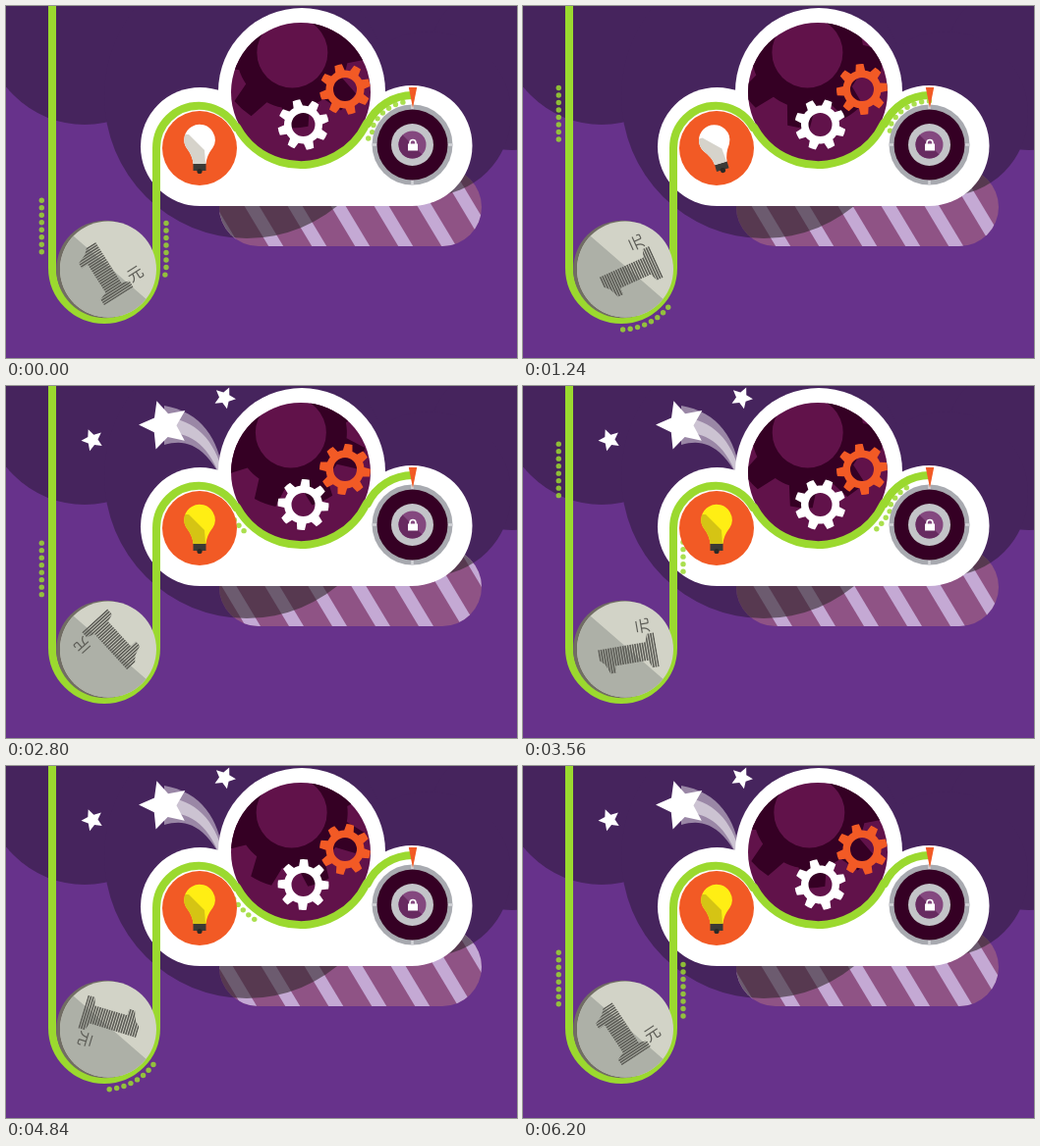
An HTML page with a canvas that plays this animation: 520 by 359 pixels, repeating every 6240 ms.

```html
<!DOCTYPE html>
<html lang="zh">
<head>
<meta charset="utf-8">
<title>Coin machine</title>
<style>
html, body { margin: 0; width: 520px; height: 359px; overflow: hidden; background: #67328b; }
canvas { display: block; }
</style>
</head>
<body>
<canvas id="stage" width="520" height="359"></canvas>
<script>
const ctx = document.getElementById('stage').getContext('2d');
const LOOP = 6240, FRAME = 40, RESTART = 640, SPIN = 2229;
const RAD = Math.PI / 180, TAU = Math.PI * 2;
const GREEN = '#9bd92f', DARK = '#350024', PLUM = '#61124a', ORANGE = '#f25a25';
const clamp = (v) => Math.max(0, Math.min(1, v));
const ease = (v) => 1 - (1 - clamp(v)) ** 2;

// Turns of the coin; gears and stripes share this clock
const spin = (t) => t < RESTART ? t / SPIN - 0.154 : (t - 4320) / SPIN;

function disc(x, y, r, color) {
  ctx.beginPath();
  ctx.arc(x, y, r, 0, TAU);
  ctx.fillStyle = color;
  ctx.fill();
}

function poly(points, color) {
  ctx.beginPath();
  points.forEach((p) => ctx.lineTo(p[0], p[1]));
  ctx.closePath();
  if (color) {
    ctx.fillStyle = color;
    ctx.fill();
  }
}

function clipDisc(x, y, r) {
  ctx.beginPath();
  ctx.arc(x, y, r, 0, TAU);
  ctx.clip();
}

function scoped(draw) {
  ctx.save();
  draw();
  ctx.restore();
}

function gear(x, y, outer, body, hole, turn, color) {
  const step = TAU / 8;
  ctx.beginPath();
  for (let i = 0; i < 8; i++) {
    const a = turn * RAD + i * step;
    ctx.arc(x, y, body, a - step * 0.5, a - step * 0.32);
    ctx.arc(x, y, outer, a - step * 0.19, a + step * 0.19);
    ctx.arc(x, y, body, a + step * 0.32, a + step * 0.5);
  }
  ctx.closePath();
  ctx.moveTo(x + hole, y);
  ctx.arc(x, y, hole, 0, TAU);
  ctx.fillStyle = color;
  ctx.fill('evenodd');
}

function star(x, y, r, turn) {
  const pts = [];
  for (let i = 0; i < 10; i++) {
    const a = turn * RAD + i * TAU / 10;
    const d = i % 2 ? r * 0.48 : r;
    pts.push([x + d * Math.cos(a), y + d * Math.sin(a)]);
  }
  poly(pts, '#fff');
}

const SHADE = [[245, 92, 145], [430, 110, 84]];

function backdrop() {
  ctx.fillStyle = '#67328b';
  ctx.fillRect(0, 0, 520, 359);
  ctx.fillStyle = '#46245d';
  ctx.fillRect(0, 0, 520, 70);
  disc(80, 19, 102, '#46245d');
  disc(515, 60, 87, '#46245d');
  SHADE.forEach(([x, y, r]) => disc(x, y, r, '#46245d'));
}

function stripes(t) {
  scoped(() => {
    ctx.beginPath();
    ctx.roundRect(217, 165, 267, 80, 40);
    ctx.clip();
    ctx.fillStyle = '#8f5385';
    ctx.fillRect(217, 165, 267, 80);
    const gap = 44, shift = (spin(t) + 4) % 1 * gap;
    for (let x = 117 + shift; x < 540; x += gap) {
      poly([[x - 23, 165], [x - 8, 165], [x + 40, 245], [x + 25, 245]], '#c4a9d4');
    }
    SHADE.forEach(([x, y, r]) => disc(x, y, r, 'rgba(50,40,45,.6)'));
  });
}

function shootingStar(t) {
  const u = ease((t - 2020) / 480);
  if (u <= 0) return;
  const at = (v) => {
    const w = 1 - v;
    return [w * w * 219 + 2 * w * v * 203 + v * v * 161,
            w * w * 90 + 2 * w * v * 40 + v * v * 40];
  };
  const trail = (wide, alpha) => {
    const left = [], right = [];
    for (let i = 0; i <= 16; i++) {
      const v = u * i / 16, [x, y] = at(v);
      const dx = -16 * (1 - v) - 42 * v, dy = -50 * (1 - v);
      const k = (2 + wide * v) / Math.hypot(dx, dy);
      left.push([x - dy * k, y + dx * k]);
      right.unshift([x + dy * k, y - dx * k]);
    }
    poly(left.concat(right), `rgba(255,255,255,${alpha})`);
  };
  trail(18, 0.45);
  trail(6, 0.5);
  const [x, y] = at(u);
  star(x, y, 26, -35 - (1 - u) * 40);
}

function stars(t) {
  const a = ease((t - 1920) / 160), b = ease((t - 2200) / 200);
  if (a) star(88, 55, 11.5 * a, -40);
  if (b) star(222.5, 12, 11.5 * b, -66);
  shootingStar(t);
}

function cloud() {
  disc(197.5, 143.5, 60.5, '#fff');
  disc(413, 142.5, 61.5, '#fff');
  disc(301, 87, 85, '#fff');
  ctx.fillRect(197, 120, 216, 84);
}

function machine(t) {
  const turn = spin(t) * 45;
  scoped(() => {
    clipDisc(300, 88, 71);
    disc(300, 88, 72, PLUM);
    const wob = 1.5 * Math.cos(spin(t) * TAU);
    gear(290.5 + wob, 47.5, 77, 57, 36, 34.5 - turn, DARK);
    gear(345, 85, 26, 19.5, 12, 22.5 - turn, ORANGE);
  });
  gear(302.5, 121, 26, 19.5, 12, turn - 9, '#fff');
}

// Track followed by the beads: [length, position at fraction u]
const onArc = (x, y, r, from, to) => (u) => {
  const a = (from + (to - from) * u) * RAD;
  return [x + r * Math.cos(a), y + r * Math.sin(a)];
};
const TRACK = [
  [48.6, onArc(414, 142, 45, 270, 205.3)],
  [184.6, onArc(300, 87.5, 83.5, 25.3, 151.2)],
  [84, onArc(196.5, 145, 33, -29, -180)],
  [122, (u) => [163, 145 + 122 * u]],
  [196.3, onArc(99.3, 267, 63, 0, 180)],
  [250, (u) => [36.3, 267 - 250 * u]]
];

function onTrack(s) {
  if (s < 0) return null;
  for (const [len, place] of TRACK) {
    if (s <= len) return place(s / len);
    s -= len;
  }
  return null;
}

function beads(t) {
  const groups = t < RESTART ? [678, 420, 36] : [628, 344, -138, -423];
  for (const start of groups) {
    for (let i = 0; i < 8; i++) {
      const p = onTrack(start + 0.1329 * t + (i - 3.5) * 7.5);
      if (p) disc(p[0], p[1], 2.7, 'rgba(155,217,47,.85)');
    }
  }
}

function belt() {
  ctx.beginPath();
  ctx.moveTo(47, -5);
  ctx.arc(100, 267, 53, Math.PI, 0, true);
  ctx.arc(196.3, 145, 43.3, Math.PI, -28.8 * RAD);
  ctx.arc(300, 88, 74, 151.2 * RAD, 25.3 * RAD, true);
  ctx.arc(414, 142, 51, 205.3 * RAD, 270 * RAD);
  ctx.strokeStyle = GREEN;
  ctx.lineWidth = 8;
  ctx.lineJoin = 'round';
  ctx.stroke();
}

function bulb(t) {
  disc(197, 145, 38, ORANGE);
  const lit = t >= 1720;
  const swing = t > 1080 && !lit ? -16 * Math.sin((t - 1080) / 640 * TAU) : 0;
  scoped(() => {
    ctx.translate(197, 145);
    ctx.rotate(swing * RAD);
    ctx.fillStyle = '#3b3a36';
    ctx.fillRect(-6.5, 15, 13, 8);
    disc(0, 23.5, 2.6, '#2a2926');
    ctx.beginPath();
    ctx.arc(0, -8.5, 15.7, 150 * RAD, 30 * RAD);
    ctx.quadraticCurveTo(7, 8, 6.5, 16);
    ctx.lineTo(-6.5, 16);
    ctx.quadraticCurveTo(-7, 8, -13.6, -0.7);
    ctx.fillStyle = lit ? '#ffee14' : '#fff';
    ctx.fill();
    ctx.clip();
    poly([[-20, -14], [-11, -14], [5, 2], [6, 16], [-20, 16]], lit ? '#d5c414' : '#d6d3cb');
  });
}

function dial() {
  disc(413.5, 141.5, 41, '#a8aab0');
  ctx.strokeStyle = '#d3d4d8';
  ctx.lineWidth = 2.5;
  for (let i = 0; i < 4; i++) {
    const c = Math.cos(i * TAU / 4), s = Math.sin(i * TAU / 4);
    ctx.beginPath();
    ctx.moveTo(413.5 + 36 * c, 141.5 + 36 * s);
    ctx.lineTo(413.5 + 41 * c, 141.5 + 41 * s);
    ctx.stroke();
  }
  disc(413.5, 141.5, 36, DARK);
  disc(413.5, 141.5, 21.5, '#c3c4c8');
  scoped(() => {
    clipDisc(413.5, 141.5, 14);
    disc(413.5, 141.5, 15, '#84487f');
    poly([[398, 126], [430, 158], [398, 158]], '#672a60');
  });
  ctx.fillStyle = '#fff';
  ctx.fillRect(409, 140.5, 10, 7);
  ctx.beginPath();
  ctx.arc(414, 139.5, 3, Math.PI, 0);
  ctx.lineTo(417, 141);
  ctx.moveTo(411, 139.5);
  ctx.lineTo(411, 141);
  ctx.strokeStyle = '#fff';
  ctx.lineWidth = 1.6;
  ctx.stroke();
  poly([[409.8, 83], [418.2, 83], [414, 104]], ORANGE);
}

function coin(t) {
  disc(101, 268.5, 49.8, '#716d64');
  scoped(() => {
    clipDisc(104, 268.5, 49);
    disc(104, 268.5, 50, '#d2d3c7');
    poly([[50, 219], [68, 234], [145, 301], [145, 330], [50, 330]], '#adb0a7');
  });
  scoped(() => {
    ctx.translate(105, 266.5);
    ctx.rotate(spin(t) * TAU + 23 * RAD);
    ctx.fillStyle = '#5c5c56';
    ctx.font = '300 16px "Noto Sans CJK SC", "Noto Sans CJK", sans-serif';
    ctx.textAlign = 'center';
    ctx.textBaseline = 'middle';
    ctx.fillText('元', 18.7, 19.5);
    poly([[-25, 30], [-25, 23], [-17, 20], [-17, -14], [-24, -14], [-24, -20],
          [-14, -24], [-9, -29], [2, -29], [2, 20], [10, 23], [10, 30]]);
    ctx.clip();
    for (let y = -29; y < 30; y += 2.5) ctx.fillRect(-26, y, 38, 1.6);
  });
}

function draw(t) {
  backdrop();
  stripes(t);
  stars(t);
  cloud();
  machine(t);
  beads(t);
  belt();
  bulb(t);
  dial();
  coin(t);
}

const origin = performance.now();
function tick() {
  const t = (performance.now() - origin) % LOOP;
  draw(Math.floor(t / FRAME) * FRAME);
  requestAnimationFrame(tick);
}
tick();
</script>
</body>
</html>
```
